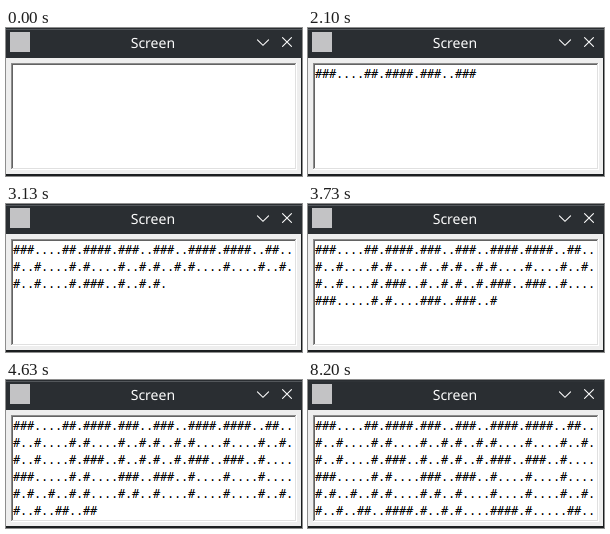
An HTML page with a canvas for the animation above (8.31 s loop, 296 by 148 pixels).

```html
<!DOCTYPE html>
<html lang="en">
<head>
<meta charset="utf-8">
<title>Screen</title>
<style>
html, body { margin: 0; width: 100%; height: 100%; overflow: hidden; background: #eee; }
canvas { display: block; }
</style>
</head>
<body>
<canvas id="stage" width="296" height="148"></canvas>
<script>
const ctx = document.getElementById('stage').getContext('2d', { alpha: false });
const LOOP = 8310;
const COLS = 40, CELL = 7, LINE = 17;
const TYPE_START = 1800, TYPE_END = 5030, REPAINTS = 57;
const TEXT = [
  '###....##.####.###..###..####.####..##..',
  '#..#....#.#....#..#.#..#.#....#....#..#.',
  '#..#....#.###..#..#.#..#.###..###..#....',
  '###.....#.#....###..###..#....#....#....',
  '#.#..#..#.#....#.#..#....#....#....#..#.',
  '#..#..##..####.#..#.#....####.#.....##..'
].join('');

// [repaint, characters typed by then]
const TYPED = [[0, 1], [5, 23], [23, 102], [34, 146], [43, 184], [REPAINTS, TEXT.length]];

function typedCount(t) {
  if (t < TYPE_START) return 0;
  if (t >= TYPE_END) return TEXT.length;
  const step = (TYPE_END - TYPE_START) / REPAINTS;
  const k = Math.floor((t - TYPE_START) / step + 0.15);
  const i = Math.max(1, TYPED.findIndex(p => k <= p[0]));
  const [k0, n0] = TYPED[i - 1], [k1, n1] = TYPED[i];
  return Math.round(n0 + (n1 - n0) * (k - k0) / (k1 - k0));
}

// Glyph with LCD antialiasing: drawn three times as wide, then every
// colour channel takes its own filtered column.
const PAD = 2, BASE = 11, GLYPH_W = 12, GLYPH_H = 15;
const FILTER = [8, 77, 86, 77, 8];

function newContext(w, h) {
  const c = document.createElement('canvas');
  c.width = w;
  c.height = h;
  return c.getContext('2d', { willReadFrequently: true });
}

function makeGlyph(ch) {
  const wide = GLYPH_W * 3;
  const big = newContext(wide, GLYPH_H);
  big.fillStyle = '#fff';
  big.fillRect(0, 0, wide, GLYPH_H);
  big.scale(3, 1);
  big.fillStyle = '#000';
  big.font = '12px "DejaVu Sans Mono", monospace';
  big.fillText(ch, PAD, BASE);
  const src = big.getImageData(0, 0, wide, GLYPH_H).data;

  const small = newContext(GLYPH_W, GLYPH_H);
  const out = small.createImageData(GLYPH_W, GLYPH_H);
  for (let y = 0; y < GLYPH_H; y++) {
    for (let col = 0; col < wide; col++) {
      let sum = 0;
      FILTER.forEach((w, j) => {
        const x = Math.min(wide - 1, Math.max(0, col + j - 2));
        sum += w * src[(y * wide + x) * 4];
      });
      const pixel = (y * GLYPH_W + Math.floor(col / 3)) * 4;
      out.data[pixel + col % 3] = sum / 256;
      out.data[pixel + 3] = 255;
    }
  }
  small.putImageData(out, 0, 0);
  return small.canvas;
}

const GLYPHS = { '#': makeGlyph('#'), '.': makeGlyph('.') };

function rect(color, x, y, w, h) {
  ctx.fillStyle = color;
  ctx.fillRect(x, y, w, h);
}

// Button symbols live on an 18 unit grid inside a 20 pixel button.
function symbol(left, ...lines) {
  ctx.save();
  ctx.translate(left, 4);
  ctx.scale(20 / 18, 20 / 18);
  ctx.strokeStyle = '#fcfcfc';
  ctx.lineWidth = 1;
  ctx.lineCap = 'round';
  ctx.beginPath();
  for (const points of lines) {
    points.forEach(([x, y], i) => i ? ctx.lineTo(x, y) : ctx.moveTo(x, y));
  }
  ctx.stroke();
  ctx.restore();
}

function drawTitleBar(t) {
  rect('#2a2e32', 0, 0, 296, 30);
  rect(t < 8200 ? '#53575b' : '#2f3337', 0, 1, 296, 1);
  rect('#c3c3c5', 4, 4, 20, 20);

  ctx.fillStyle = '#fcfcfc';
  ctx.font = '14px "Noto Sans", sans-serif';
  ctx.textRendering = 'geometricPrecision';
  ctx.fillText('Screen', 124.7, 20);

  symbol(247, [[4, 7], [9, 12], [14, 7]]);
  symbol(271, [[5, 5], [13, 13]], [[13, 5], [5, 13]]);
}

function drawTextArea() {
  rect('#eeeeee', 0, 30, 296, 116);
  rect('#1b1e20', 0, 146, 296, 2);
  rect('#1b1e20', 295, 30, 1, 116);
  // lowered bevel, outside to inside
  rect('#ffffff', 5, 35, 286, 107);
  rect('#8d8d8d', 5, 35, 285, 106);
  rect('#e0e0e0', 6, 36, 284, 105);
  rect('#636363', 6, 36, 283, 104);
  rect('#ffffff', 7, 37, 282, 103);
}

function drawText(count) {
  ctx.globalCompositeOperation = 'multiply';
  for (let i = 0; i < count; i++) {
    const x = 7 + CELL * (i % COLS);
    const y = 50 + LINE * Math.floor(i / COLS);
    ctx.drawImage(GLYPHS[TEXT[i]], x - PAD, y - BASE);
  }
  ctx.globalCompositeOperation = 'source-over';
}

const start = performance.now();
function frame() {
  const t = (performance.now() - start) % LOOP;
  drawTitleBar(t);
  drawTextArea();
  drawText(typedCount(t));
  requestAnimationFrame(frame);
}
frame();
</script>
</body>
</html>
```
